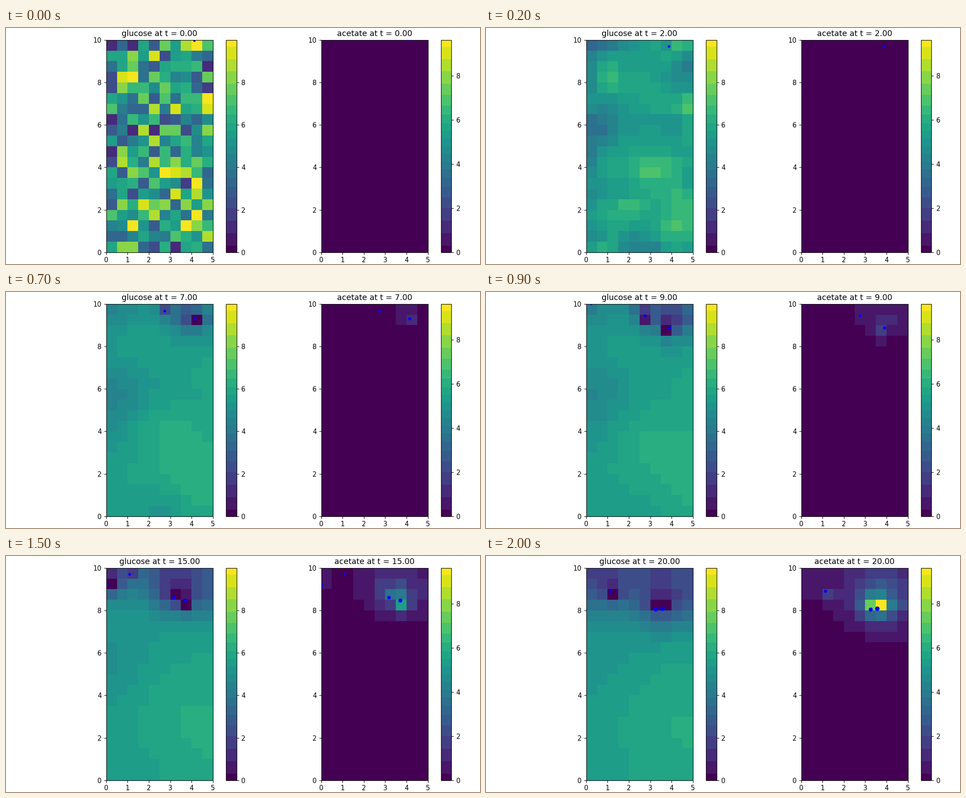
Write a matplotlib script that moves like this. It is 1058 px wide and 529 px high and loops after 2100 ms.

```python
import numpy as np
import matplotlib.pyplot as plt
from matplotlib.animation import FuncAnimation
from matplotlib.colors import ListedColormap

W, H, DPI = 1058, 529, 105.8
STEPS, SUB = 21, 20
DT = 1 / SUB
DIFF = 0.31                    # cells^2 per time unit
G_MAX, A_MAX = 9.99, 9.62

# Rich and poor spots of the first glucose field: x, y, height
SPOTS = [(0.2, 9.6, -1.8), (4.2, 9.9, 2.0), (4.8, 8.6, -2.2),
         (1.2, 8.0, 2.0), (0.6, 6.2, -2.2), (2.3, 3.7, 2.2),
         (4.1, 1.8, 2.2), (1.5, 1.5, 1.8), (3.1, 0.4, -2.2)]

# Each microbe: acetate yield and waypoints (t, x, y)
MICROBES = [
    (0.0240, [(0, 4.12, 9.98), (1, 3.86, 9.80), (5, 3.91, 9.44),
              (7, 4.15, 9.30), (9, 3.91, 8.87), (15, 3.71, 8.465),
              (20, 3.57, 8.08)]),
    (0.0293, [(4, 2.71, 10.0), (9, 2.76, 9.44), (12, 2.82, 9.15),
              (15, 3.18, 8.60), (20, 3.26, 8.04)]),
    (0.0150, [(8, 0.27, 10.1), (12, 0.115, 9.70), (16, 0.0, 9.02)]),
    (0.0240, [(12, 1.03, 10.0), (15, 1.10, 9.70), (18, 1.12, 8.97),
              (20, 1.14, 8.90)]),
]


def start_field():
    """Smooth landscape plus noise that averages out over 2x2 cells."""
    x, y = np.meshgrid(np.arange(0.25, 5, 0.5), np.arange(0.25, 10, 0.5))
    field = 5.43 - 0.5 * np.cos(np.pi * x / 5)
    for sx, sy, height in SPOTS:
        field += height * np.exp(-((x - sx) ** 2 + (y - sy) ** 2) / 0.8)
    noise = np.random.default_rng(7).uniform(-4.3, 4.3, (20, 10))
    mean = noise.reshape(10, 2, 5, 2).mean(axis=(1, 3))
    return np.clip(field + noise - np.kron(mean, np.ones((2, 2))), 0.9, 9.9)


def diffuse(field):
    p = np.pad(field, 1, mode="edge")
    lap = p[2:, 1:-1] + p[:-2, 1:-1] + p[1:-1, 2:] + p[1:-1, :-2] - 4 * field
    return field + DIFF * DT * lap


def active(t):
    """Microbes in the colony at time t as (x, y, age, gain)."""
    found = []
    for gain, path in MICROBES:
        ts, xs, ys = zip(*path)
        if ts[0] <= t <= ts[-1] + 1e-6:
            found.append((np.interp(t, ts, xs), np.interp(t, ts, ys),
                          t - ts[0], gain))
    return found


def simulate():
    glucose, acetate = start_field(), np.zeros((20, 10))
    frames = [(glucose, acetate)]
    for n in range(1, (STEPS - 1) * SUB + 1):
        glucose, acetate = diffuse(glucose), diffuse(acetate)
        for x, y, age, gain in active(n * DT):
            cell = min(int(y * 2), 19), int(x * 2)
            glucose[cell] *= np.exp(-(0.15 + 0.04 * age ** 3) * DT)
            acetate[cell] = max(acetate[cell], gain * age ** 2)
        if n % SUB == 0:
            frames.append((glucose.copy(), acetate.copy()))
    return frames


def banded_viridis():
    """Viridis cut into flat bands, finer towards the middle."""
    u = (np.arange(1, 22) - 0.5) / 21
    edges = np.r_[0, u + 0.045 * np.sin(2 * np.pi * u), 1]
    mids = (edges[:-1] + edges[1:]) / 2
    mids[0] = 0
    level = (np.arange(256) + 0.5) / 256
    band = np.searchsorted(edges, level) - 1
    return ListedColormap(plt.get_cmap("viridis")(mids[band]))


fig = plt.figure(figsize=(W / DPI, H / DPI), dpi=DPI, facecolor="white")
cmap = banded_viridis()
frames = simulate()


def add_axes(left, width):
    return fig.add_axes([left / W, 26.2 / H, width / W, 476 / H])


def panel(left, vmax):
    ax = add_axes(left, 238)
    mesh = ax.pcolormesh(np.linspace(0, 5, 11), np.linspace(0, 10, 21),
                         np.zeros((20, 10)), cmap=cmap, vmin=0, vmax=vmax)
    dots = ax.scatter([], [], color="blue", linewidths=0, zorder=2)
    ax.set(xlim=(0, 5), ylim=(0, 10), xticks=range(6), yticks=range(0, 11, 2))
    bar = fig.colorbar(mesh, cax=add_axes(left + 267, 23.8))
    bar.set_ticks(range(0, 9, 2))
    return ax, mesh, dots


panels = [("glucose", *panel(223.8, G_MAX)), ("acetate", *panel(703.6, A_MAX))]


def draw(i):
    x, y, age, _ = np.array(active(i)).T
    radius = 2.7 + 0.115 * age
    sizes = (2 * radius * 72 / DPI) ** 2
    for (name, ax, mesh, dots), field in zip(panels, frames[i]):
        mesh.set_array(field)
        dots.set_offsets(np.column_stack([x, y]))
        dots.set_sizes(sizes)
        ax.set_title(f"{name} at t = {i:.2f}")
    return []


anim = FuncAnimation(fig, draw, frames=STEPS, interval=100, repeat=True,
                     repeat_delay=0, blit=False)
plt.show()
```
